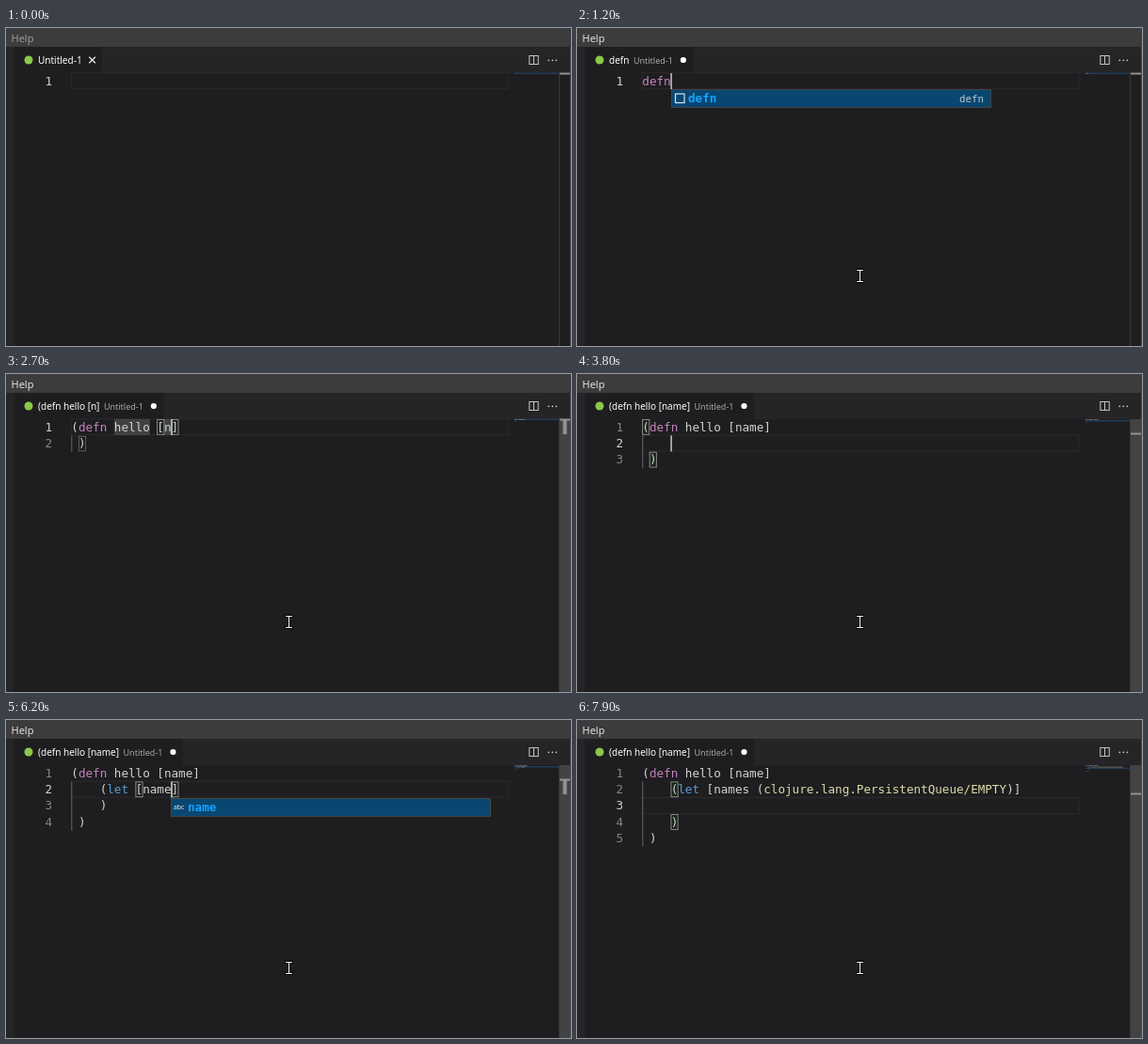
An HTML page with a canvas that plays this animation: 600x338 px, repeating every 8 s.

```html
<!DOCTYPE html>
<html lang="en">
<head>
<meta charset="utf-8">
<title>Editor snippets</title>
<style>
html, body { margin: 0; width: 100%; height: 100%; overflow: hidden; background: #1e1d1f; }
canvas { display: block; width: 100vw; height: 100vh; }
</style>
</head>
<body>
<canvas id="stage"></canvas>
<script>
const W = 600, H = 338, LOOP = 8000;
const canvas = document.getElementById("stage");
const ctx = canvas.getContext("2d");
const scale = window.devicePixelRatio || 1;
canvas.width = W * scale;
canvas.height = H * scale;
ctx.scale(scale, scale);

const MONO = '"DejaVu Sans Mono", monospace';
const UI = '"Noto Sans", sans-serif';
const CODE_FONT = `12.6px ${MONO}`;
const LEFT = 69.3, TOP = 48, CHAR = 7.585, ROW = 17.35;
const TOKEN_COLORS = { defn: "#c586c0", let: "#569cd6" };
const colX = col => LEFT + col * CHAR;
const rowY = row => TOP + row * ROW;

// Each step holds the document, with "|" marking the caret.
const steps = [];
function add(time, marked, extra = {}) {
  const before = marked.split("|")[0].split("\n");
  steps.push({
    time, ...extra,
    lines: marked.replace("|", "").split("\n"),
    row: before.length - 1,
    col: before[before.length - 1].length
  });
}
function type(start, gap, word, template, extra) {
  for (let i = 0; i < word.length; i++) {
    add(start + i * gap, template.replace("~", word.slice(0, i + 1) + "|"), extra);
  }
}

const HEAD = "(defn hello [name]\n";
const LET = HEAD + "    (let [~]\n    )\n )";
const QUEUE = HEAD + "    (let [names (clojure.lang.PersistentQueue/EMPTY)]\n";
const inLet = content => LET.replace("~", content);
const snippet = { snippet: true };

add(0, "|");
type(800, 100, "defn", "~");
add(1150, "defn|", { popup: "defn" });
add(1500, "(defn | []\n )", snippet);
type(1800, 120, "hello", "(defn ~ []\n )", snippet);
add(2500, "(defn hello [|]\n )", snippet);
type(2700, 100, "name", "(defn hello [~]\n )", snippet);
add(3300, HEAD + " |)");
add(3600, HEAD + "    |\n )");
type(4400, 150, "let", HEAD + "    ~\n )");
add(4800, HEAD + "    let|\n )", { popup: "let" });
add(5300, inLet("|"));
type(5800, 100, "name", LET);
add(6150, inLet("name|"), { popup: "name", plainWord: true });
add(6400, inLet("names|"));
add(6500, inLet("names |"));
add(6600, inLet("names (|)"));
add(6900, inLet("names (clojure.lang.PersistentQueue/EMPTY|)"));
add(7200, QUEUE + "    |)\n )");
add(7350, QUEUE + "        |\n    )\n )");

function rect(x, y, w, h, color) {
  ctx.fillStyle = color;
  ctx.fillRect(x, y, w, h);
}
function outline(x, y, w, h, color, width = 1) {
  ctx.strokeStyle = color;
  ctx.lineWidth = width;
  ctx.strokeRect(x, y, w, h);
}
function text(value, x, y, font, color, align = "left") {
  ctx.font = font;
  ctx.fillStyle = color;
  ctx.textAlign = align;
  ctx.fillText(value, x, y);
  return ctx.measureText(value).width;
}
function dot(x, y, r, color) {
  ctx.fillStyle = color;
  ctx.beginPath();
  ctx.arc(x, y, r, 0, Math.PI * 2);
  ctx.fill();
}
function strokes(color, width, ...segments) {
  ctx.strokeStyle = color;
  ctx.lineWidth = width;
  ctx.beginPath();
  for (const [x1, y1, x2, y2] of segments) {
    ctx.moveTo(x1, y1);
    ctx.lineTo(x2, y2);
  }
  ctx.stroke();
}

function tokens(line) {
  return line.split(/((?<=\()(?:defn|let|clojure[^)]*))/).map(value => ({
    value,
    color: TOKEN_COLORS[value] || (value.startsWith("clojure") ? "#dcdcaa" : "#d4d4d4")
  }));
}

// Pair of brackets that encloses the caret, as [row, col] positions.
function enclosingPair({ lines, row, col }) {
  const open = [], found = [];
  lines.forEach((line, r) => [...line].forEach((ch, c) => {
    if ("([".includes(ch)) open.push([r, c]);
    if (")]".includes(ch)) found.push([open.pop(), [r, c]]);
  }));
  const before = ([r, c]) => r < row || (r === row && c < col);
  return found.find(([a, b]) => before(a) && !before(b)) || [];
}

function drawChrome(step, focused) {
  rect(0, 0, W, H, "#1e1d1f");
  rect(0, 0, W, 20, "#3c3b3d");
  text("Help", 5.5, 14.5, `11px ${UI}`, focused ? "#e2e2e2" : "#9b9a9b");
  rect(0, 20, W, 28, "#252426");
  rect(0, 48, 8.5, H, "#252426");

  const title = step.lines[0].trim();
  const label = title || "Untitled-1";
  const labelFont = `10px ${UI}`, noteFont = `9px ${UI}`;
  ctx.font = labelFont;
  let end = 34 + ctx.measureText(label).width;
  if (title) {
    ctx.font = noteFont;
    end += 4.5 + ctx.measureText("Untitled-1").width;
  }
  rect(8.5, 20, end + 13, 28, "#1e1d1f");
  dot(24, 34, 4.5, "#8cc84b");
  const width = text(label, 34, 37.5, labelFont, "#ffffff");
  const mark = end + 11;
  if (title) {
    text("Untitled-1", 34 + width + 4.5, 37.5, noteFont, "#a9a9a9");
    dot(mark, 34, 3.1, "#ffffff");
  } else {
    strokes("#e4e4e4", 1.3, [mark - 3.3, 30.7, mark + 3.3, 37.3], [mark + 3.3, 30.7, mark - 3.3, 37.3]);
  }

  outline(555.8, 29.5, 9.4, 9, "#c5c5c5");
  strokes("#c5c5c5", 1, [560.5, 29.5, 560.5, 38.5]);
  for (const x of [576.3, 580.3, 584.3]) dot(x, 34.3, 0.9, "#c5c5c5");
}

function drawRightSide(step, pair) {
  const y = TOP + step.row * 1.5;
  rect(540, y - 0.5, 47, 1.5, "#223c59");
  step.lines.forEach((line, r) => {
    let col = 0;
    ctx.globalAlpha = 0.5;
    for (const { value, color } of tokens(line)) {
      [...value].forEach((ch, i) => {
        if (ch !== " ") rect(540 + (col + i) * 0.75, TOP + r * 1.5, 0.65, 1, color);
      });
      col += value.length;
    }
    ctx.globalAlpha = 1;
  });
  rect(587, TOP, 1, H, "#39383a");
  if (step.lines.length > 1) rect(588, TOP, 11, H, "#434244");
  const mark = TOP + step.row * 15;
  rect(588, mark - 0.5, 11, 2, "#929193");
  if (pair.length && pair[0][0] === step.row) rect(591.5, mark, 4, 16, "#929193");
  rect(599, 20, 1, H, "#4a494b");
}

function drawCode(step, pair) {
  outline(LEFT, rowY(step.row) - 0.2, 533 - LEFT, ROW - 0.4, "#2b2a2c");

  if (step.snippet) {
    const [, name, args] = step.lines[0].match(/defn (\w*) \[(\w*)/);
    const shade = "rgba(124,124,124,0.38)";
    rect(colX(6), TOP, name.length * CHAR, ROW - 0.5, shade);
    rect(colX(8 + name.length), TOP, args.length * CHAR, ROW - 0.5, shade);
    outline(colX(1) + 0.5, rowY(1) + 1, CHAR - 0.5, ROW - 2, "#5e5d5f");
  }
  if (step.lines.length > 1) {
    rect(LEFT, rowY(1), 1, ROW * (step.lines.length - 1), "#666567");
  }
  for (const [r, c] of pair) {
    rect(colX(c), rowY(r) + 0.5, CHAR, ROW - 1.5, "rgba(0,100,0,0.1)");
    outline(colX(c) + 0.3, rowY(r) + 0.5, CHAR - 0.4, ROW - 1.5, "#888888");
  }

  step.lines.forEach((line, r) => {
    const base = rowY(r) + 12.7;
    text(r + 1, 49, base, CODE_FONT, r === step.row ? "#d0d0d0" : "#858585", "right");
    let col = 0;
    for (const { value, color } of tokens(line)) {
      text(value, colX(col), base, CODE_FONT, color);
      col += value.length;
    }
  });
}

function drawPopup({ popup, plainWord, row, col }) {
  const x = Math.round(colX(col)), y = Math.round(rowY(row + 1));
  rect(x, y, 340, 20, "#454446");
  rect(x + 1, y + 1, 338, 18, "#094771");
  if (plainWord) {
    text("abc", x + 3, y + 12.3, `6.8px ${UI}`, "#f0f0f0");
  } else {
    outline(x + 4.5, y + 5, 9.5, 9.5, "#d8e2ea", 1.2);
    text(popup, x + 332, y + 13.5, `10.8px ${MONO}`, "#bdc9d3", "right");
  }
  text(popup, x + 18, y + 14, `bold ${CODE_FONT}`, "#18a3ff");
}

function drawPointer(x, y) {
  const beam = [
    [x, y - 5, x, y + 5],
    [x - 3, y - 6, x + 3, y - 6],
    [x - 3, y + 6, x + 3, y + 6]
  ];
  ctx.lineCap = "square";
  strokes("#000000", 3, ...beam);
  strokes("#f2f2f2", 1.2, ...beam);
  ctx.lineCap = "butt";
}

function draw(time) {
  const step = steps.findLast(s => s.time <= time);
  const pair = enclosingPair(step);
  drawChrome(step, time >= 100);
  drawRightSide(step, pair);
  drawCode(step, pair);
  const caretOn = (time - Math.max(step.time, 200)) % 1000 < 500;
  if (time >= 200 && caretOn) {
    rect(colX(step.col) - 0.3, rowY(step.row), 1.5, ROW - 0.3, "#c8c8c8");
  }
  if (step.popup) drawPopup(step);
  if (time >= 200) drawPointer(300.5, 263.5);
}

function tick() {
  draw(performance.now() % LOOP);
  requestAnimationFrame(tick);
}
tick();
</script>
</body>
</html>
```
